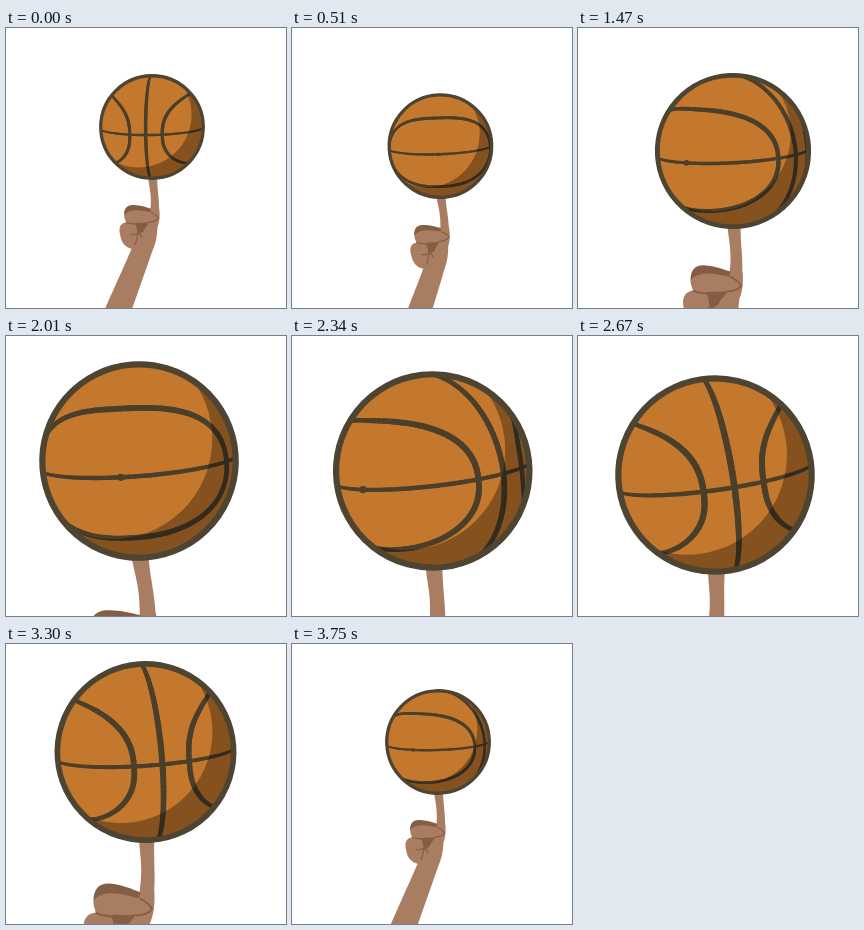
These frames come from a looping animation (280 px wide and 280 px high, 3780 ms). An HTML page with a canvas:

```html
<!DOCTYPE html>
<html lang="en">
<head>
<meta charset="utf-8">
<title>Spinning basketball</title>
<style>
html, body { margin: 0; width: 100%; height: 100%; overflow: hidden; background: #fff; }
canvas { display: block; width: 280px; height: 280px; }
</style>
</head>
<body>
<canvas id="stage" width="280" height="280"></canvas>
<script>
const ctx = document.getElementById('stage').getContext('2d');
const LOOP = 3780, STEP = 30;
const RAD = Math.PI / 180;
const PITCH = 8.7 * RAD;
const SPIN = 180 * 13 / 21; // degrees per step
const SMALL = 53, LARGE = 100;

// Key poses as [time, value] pairs
const ballX = [[0, 146], [180, 145], [360, 153], [580, 147], [780, 152.5], [1020, 143], [1080, 142],
  [1300, 149], [1470, 155], [1560, 150], [1650, 140], [1800, 128], [2010, 133], [2250, 144.5],
  [2520, 130], [2670, 137], [2790, 143.5], [3000, 136], [3180, 136], [3300, 139.5], [3400, 152],
  [3520, 154], [3750, 146], [LOOP, 146]];
const ballY = [[0, 99], [270, 109], [540, 119], [800, 122], [1020, 121], [1470, 123], [1620, 120.5],
  [1740, 117], [2010, 125], [2200, 132], [2670, 139], [2900, 133], [3240, 116], [3300, 108],
  [3400, 97], [3550, 95], [3750, 98], [LOOP, 99]];
const armTilt = [[0, 0], [360, -4], [1020, 6], [1470, 1.5], [2010, -3.5], [2670, 5], [3300, 4], [LOOP, 0]];
const ballRoll = [[0, -1], [1020, -3.5], [1470, -3], [2010, -4.5], [2670, -8], [3300, -4], [3750, -2], [LOOP, -1]];

function sample(keys, t) {
  let i = 0;
  while (i < keys.length - 2 && t >= keys[i + 1][0]) i++;
  const [t0, a] = keys[i], [t1, b] = keys[i + 1];
  const slope = j => {
    if (j < 1 || j > keys.length - 2) return 0;
    const [before, after] = [keys[j - 1], keys[j + 1]];
    const v = keys[j][1];
    if ((v - before[1]) * (after[1] - v) <= 0) return 0;
    return (after[1] - before[1]) / (after[0] - before[0]);
  };
  const d = t1 - t0, u = (t - t0) / d, w = 1 - u;
  return a * w * w * (1 + 2 * u) + b * u * u * (3 - 2 * u)
    + d * u * w * (slope(i) * w - slope(i + 1) * u);
}

function ease(t, from, to) {
  const u = Math.min(1, Math.max(0, (t - from) / (to - from)));
  return (1 - Math.cos(Math.PI * u)) / 2;
}

const TIP = { x: 146.5, y: 151 };
const skin = new Path2D('M142 146C142 156 146 163 144.5 181L127 177C120 177 117 182 118.5 190L120 194' +
  'C114 195 112.5 200 114 206C115 214 119 219 125.5 220.5C123 227 118 238 80.5 322H111.5L147 221' +
  'C150 214 151 208 151.5 199C154 193 154 185 153 179C153 168 151 160 151 146Z');
const knuckles = new Path2D('M118.3 187C118 179 122 176.5 128 176.8C134 177 140 179 145 180.5L144.5 184' +
  'C136 182.5 124 179.5 118.3 187Z');
const palm = new Path2D('M129 195C134 194 139 195 143.5 193.5C141 198 139 199 137.5 203L132 207C131 203 131 199 129 195Z');
const folds = new Path2D('M120 194C123 196 127 195 129.5 196M145 184C149 186 152 188 152.5 190C150 193 146 194 143 194' +
  'M132 205C129 207 127 207 124 206M132 206L129 217M134 205L136 210');

function drawHand(x, y, scale, tilt) {
  ctx.save();
  ctx.translate(x, y);
  ctx.scale(scale, scale);
  ctx.rotate(tilt * RAD);
  ctx.translate(-TIP.x, -TIP.y);
  ctx.fillStyle = '#a87d61';
  ctx.fill(skin);
  ctx.fillStyle = '#855d45';
  ctx.fill(knuckles);
  ctx.fill(palm);
  ctx.strokeStyle = '#855d45';
  ctx.lineWidth = 1.1;
  ctx.stroke(folds);
  ctx.restore();
}

function project(lon, lat) {
  const up = Math.sin(lat);
  const front = Math.cos(lat) * Math.cos(lon);
  return {
    x: Math.cos(lat) * Math.sin(lon),
    y: front * Math.sin(PITCH) - up * Math.cos(PITCH),
    z: front * Math.cos(PITCH) + up * Math.sin(PITCH)
  };
}

function drawSeam(curve, width) {
  const count = 120;
  let last = null;
  for (let i = 0; i <= count; i++) {
    const p = project(...curve(i / count * 2 * Math.PI));
    if (last && p.z > 0 && last.z > 0) {
      ctx.lineWidth = width * (0.5 + 0.5 * p.z);
      ctx.beginPath();
      ctx.moveTo(last.x, last.y);
      ctx.lineTo(p.x, p.y);
      ctx.stroke();
    }
    last = p;
  }
}

const bend = v => Math.sign(v) * Math.abs(v) ** (2 / 2.4);

function disc(x, y, r) {
  ctx.beginPath();
  ctx.arc(x, y, r, 0, 2 * Math.PI);
}

function drawBall(x, y, r, roll, spin) {
  ctx.save();
  ctx.translate(x, y);
  ctx.scale(r, r);
  ctx.rotate(roll * RAD);
  ctx.save();
  disc(0, 0, 0.985);
  ctx.clip();
  ctx.fillStyle = '#c4782d';
  ctx.fillRect(-1, -1, 2, 2);

  ctx.strokeStyle = ctx.fillStyle = '#4b3f2a';
  ctx.lineCap = 'round';
  drawSeam(a => [a, 0], 0.046);
  drawSeam(a => [spin, a], 0.066);
  for (const side of [-1, 1]) {
    const middle = spin + side * Math.PI / 2;
    drawSeam(a => [middle + 72 * RAD * bend(Math.cos(a)), 41 * RAD * bend(Math.sin(a))], 0.064);
    const knot = project(middle, 0);
    if (knot.z > 0) {
      disc(knot.x, knot.y, 0.036);
      ctx.fill();
    }
  }

  ctx.beginPath();
  ctx.rect(-2, -2, 4, 4);
  ctx.arc(-0.25, -0.24, 1, 0, 2 * Math.PI);
  ctx.fillStyle = 'rgba(0, 0, 0, 0.32)';
  ctx.fill('evenodd');
  ctx.restore();

  disc(0, 0, 0.967);
  ctx.strokeStyle = '#4d4431';
  ctx.lineWidth = 0.062;
  ctx.stroke();
  ctx.restore();
}

function draw(now) {
  const step = Math.floor((now % LOOP) / STEP);
  const t = step * STEP;
  const zoom = ease(t, 1140, 1770) - ease(t, 3120, 3750);
  const r = SMALL + (LARGE - SMALL) * zoom;
  const x = sample(ballX, t), y = sample(ballY, t);
  ctx.fillStyle = '#fff';
  ctx.fillRect(0, 0, 280, 280);
  drawHand(x + 0.01 * r, y + 0.985 * r, r / SMALL, sample(armTilt, t));
  drawBall(x, y, r, sample(ballRoll, t), (step * SPIN - 7) * RAD);
}

const start = performance.now();
function tick() {
  draw(performance.now() - start);
  requestAnimationFrame(tick);
}
tick();
</script>
</body>
</html>
```
